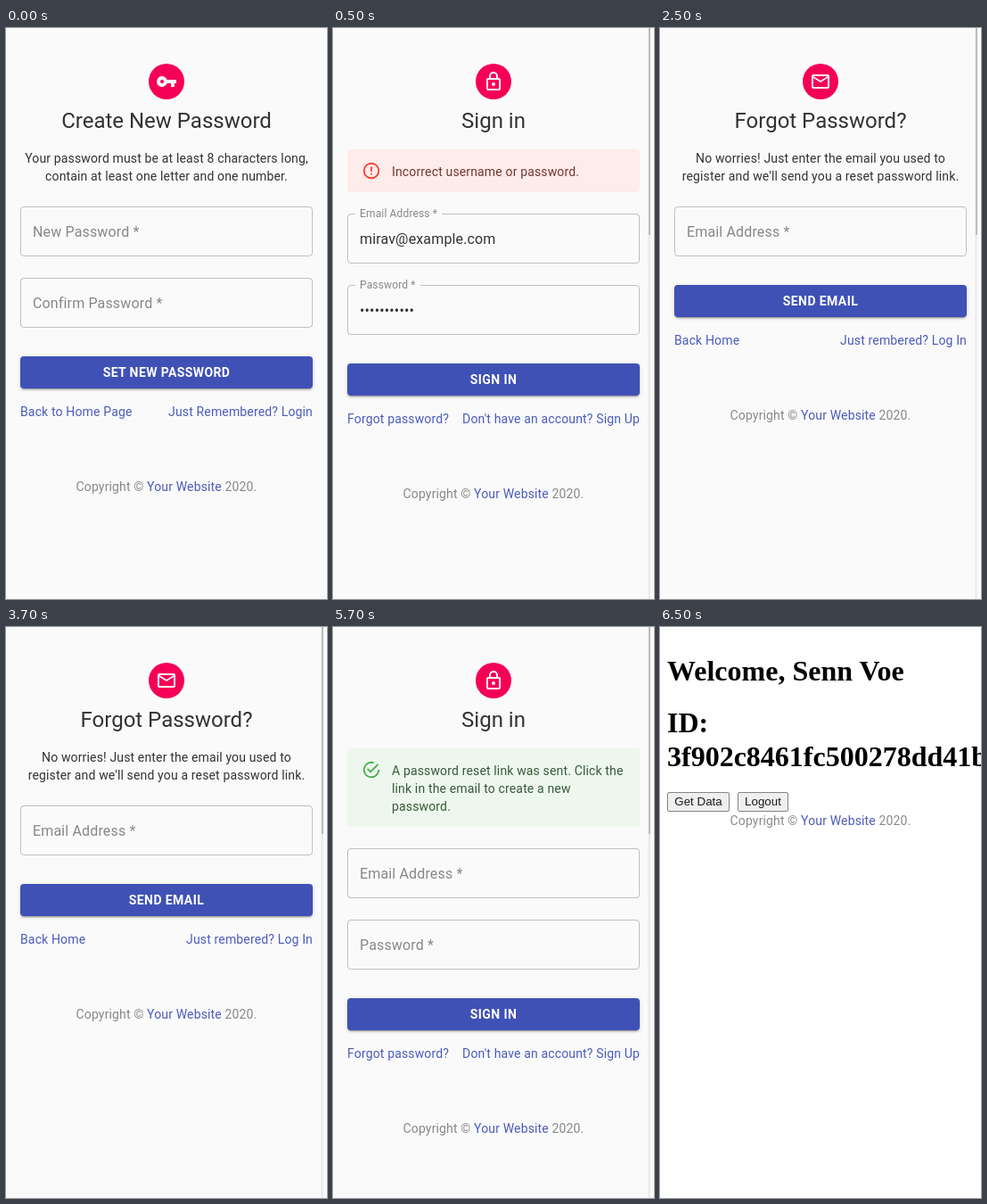
Write an HTML page that moves like this. It is 360 px wide and 640 px high and loops after 8 s.

```html
<!DOCTYPE html>
<html lang="en">
<head>
<meta charset="utf-8">
<title>Account screens</title>
<style>
html, body { margin: 0; width: 100%; height: 100%; overflow: hidden; background: #fafafa; }
#stage { position: relative; width: 360px; height: 640px; overflow: hidden; }
.scene { position: absolute; inset: 0; overflow: hidden; opacity: 0; background: #fafafa;
  font: 14px/20px Roboto, sans-serif; letter-spacing: .01071em; color: rgba(0,0,0,.8); }
.scene > * { position: absolute; box-sizing: border-box; white-space: nowrap; }
.avatar { left: 160px; top: 40px; width: 40px; height: 40px; border-radius: 50%; background: #f50057; }
svg { display: block; fill: currentColor; }
.avatar svg { width: 24px; height: 24px; margin: 8px; color: #fafafa; }
.title { left: 0; width: 360px; top: 88px; text-align: center; font-size: 24px; line-height: 32px; letter-spacing: 0; }
.intro { left: 0; width: 360px; top: 136px; text-align: center; }
.alert { left: 16px; width: 328px; top: 136px; padding: 15px 0 13px 50px; border-radius: 4px; }
.alert svg { position: absolute; left: 16px; top: 13px; width: 22px; height: 22px; }
.error { background: #fdecea; color: #75352f; }
.error svg { color: #f44336; }
.success { background: #edf7ed; color: #38593a; }
.success svg { color: #4caf50; }
.field { left: 16px; width: 328px; height: 56px; border: 1px solid rgba(0,0,0,.23); border-radius: 4px;
  font-size: 16px; line-height: 56px; letter-spacing: .00938em; padding-left: 13px; }
.label { color: rgba(0,0,0,.46); }
.filled .label { position: absolute; left: 8px; top: -7px; padding: 0 5px; background: #fafafa;
  font-size: 12px; line-height: 12px; }
.button { left: 16px; width: 328px; height: 36px; border-radius: 4px; background: #3f51b5; color: #fff;
  text-align: center; font-weight: 700; line-height: 36px; letter-spacing: .02857em;
  box-shadow: 0 3px 1px -2px rgba(0,0,0,.2), 0 2px 2px rgba(0,0,0,.14), 0 1px 5px rgba(0,0,0,.12); }
.link { color: #4b5cba; }
.left { left: 16px; }
.right { right: 16px; }
.copy { left: 0; width: 360px; text-align: center; color: rgba(0,0,0,.46); }
.track { left: 353px; top: 0; width: 3px; height: 640px; background: #eee; }
.thumb { left: 354px; top: 0; width: 2px; height: 232px; background: #bdbdbd; }
.home { background: #fff; }
.big { left: 8px; font: bold 32px/37px "Liberation Serif", serif; letter-spacing: 0; color: #000; }
.plain { top: 185px; height: 22px; border: 1px solid #858585; border-radius: 2px; background: #efefef;
  color: #1a1a1a; text-align: center; font: 13.333px/20px "Liberation Sans", sans-serif; letter-spacing: 0; }
</style>
</head>
<body>
<div id="stage"></div>
<script>
const LOOP = 8000;

const icons = {
  key: '<path d="M12.65 10A6 6 0 1 0 12.65 14H17v4h4v-4h2v-4zM7 14a2 2 0 1 1 0-4 2 2 0 0 1 0 4z"/>',
  lock: '<circle cx="12" cy="15" r="2"/><path d="M18 8h-1V6A5 5 0 0 0 7 6v2H6a2 2 0 0 0-2 2v10a2 2 0 0 0 2 2h12a2 2 0 0 0 2-2V10a2 2 0 0 0-2-2zM8.9 6a3.1 3.1 0 0 1 6.2 0v2H8.9zM18 20H6V10h12z"/>',
  mail: '<path d="M20 4H4a2 2 0 0 0-2 2v12a2 2 0 0 0 2 2h16a2 2 0 0 0 2-2V6a2 2 0 0 0-2-2zm0 14H4V8l8 5 8-5zm-8-7L4 6h16z"/>',
  error: '<circle cx="12" cy="12" r="9" fill="none" stroke="currentColor" stroke-width="2"/><path d="M11 7h2v6h-2zM11 15h2v2h-2z"/>',
  success: '<path d="M20 12A8 8 0 1 1 14.2 4.31L15.77 2.74A10 10 0 1 0 22 12zM7.91 10.08L6.5 11.5 11 16 21 6 19.59 4.58 11 13.17z"/>'
};

const icon = name => `<svg viewBox="0 0 24 24">${icons[name]}</svg>`;
const box = (cls, top, html) => `<div class="${cls}" style="top:${top}px">${html}</div>`;
const head = (name, title) => `<div class="avatar">${icon(name)}</div><div class="title">${title}</div>`;
const intro = html => `<div class="intro">${html}</div>`;
const alertBox = (kind, html) => `<div class="alert ${kind}">${icon(kind)}${html}</div>`;
const field = (top, label, value = '') =>
  box(value ? 'field filled' : 'field', top, `<span class="label">${label} *</span>${value}`);
const copy = top => box('copy', top, 'Copyright © <span class="link">Your Website</span> 2020.');
// Button, link row and footer keep fixed distances.
const actions = (top, text, left, right) =>
  box('button', top, text) + box('link left', top + 52, left) +
  box('link right', top + 52, right) + copy(top + 136);
const signIn = top => actions(top, 'SIGN IN', 'Forgot password?', "Don't have an account? Sign Up");
const scrollbar = '<div class="track"></div><div class="thumb"></div>';
const plain = (x, w, text) => `<div class="plain" style="left:${x}px;width:${w}px">${text}</div>`;

const scenes = [
  { at: 0, html: head('key', 'Create New Password') +
    intro('Your password must be at least 8 characters long,<br>contain at least one letter and one number.') +
    field(200, 'New Password') + field(280, 'Confirm Password') +
    actions(368, 'SET NEW PASSWORD', 'Back to Home Page', 'Just Remembered? Login') },
  { at: 500, html: head('lock', 'Sign in') +
    alertBox('error', 'Incorrect username or password.') +
    field(208, 'Email Address', 'mirav@example.com') + field(288, 'Password', '•'.repeat(11)) +
    signIn(376) + scrollbar },
  { at: 2500, html: head('mail', 'Forgot Password?') +
    intro("No worries! Just enter the email you used to<br>register and we'll send you a reset password link.") +
    field(200, 'Email Address') +
    actions(288, 'SEND EMAIL', 'Back Home', 'Just rembered? Log In') + scrollbar },
  { at: 4500, html: head('lock', 'Sign in') +
    alertBox('success', 'A password reset link was sent. Click the<br>link in the email to create a new<br>password.') +
    field(248, 'Email Address') + field(328, 'Password') + signIn(416) + scrollbar },
  { at: 6500, cls: 'home', html: box('big', 31, 'Welcome, Senn Voe') +
    box('big', 89, 'ID:') + box('big', 127, '3f902c8461fc500278dd41b7') +
    plain(8, 70, 'Get Data') + plain(87, 57, 'Logout') + copy(207) }
];

const stage = document.getElementById('stage');
scenes.forEach(({ at, cls = '', html }, i) => {
  const el = document.createElement('div');
  el.className = `scene ${cls}`;
  el.innerHTML = html;
  stage.append(el);
  const end = i + 1 < scenes.length ? scenes[i + 1].at : LOOP;
  const steps = [[0, at ? 0 : 1], [at, 1], [end, 0], [LOOP, 0]];
  el.animate(
    steps.map(([t, opacity]) => ({ offset: t / LOOP, opacity, easing: 'step-end' })),
    { duration: LOOP, iterations: Infinity }
  );
});
</script>
</body>
</html>
```
